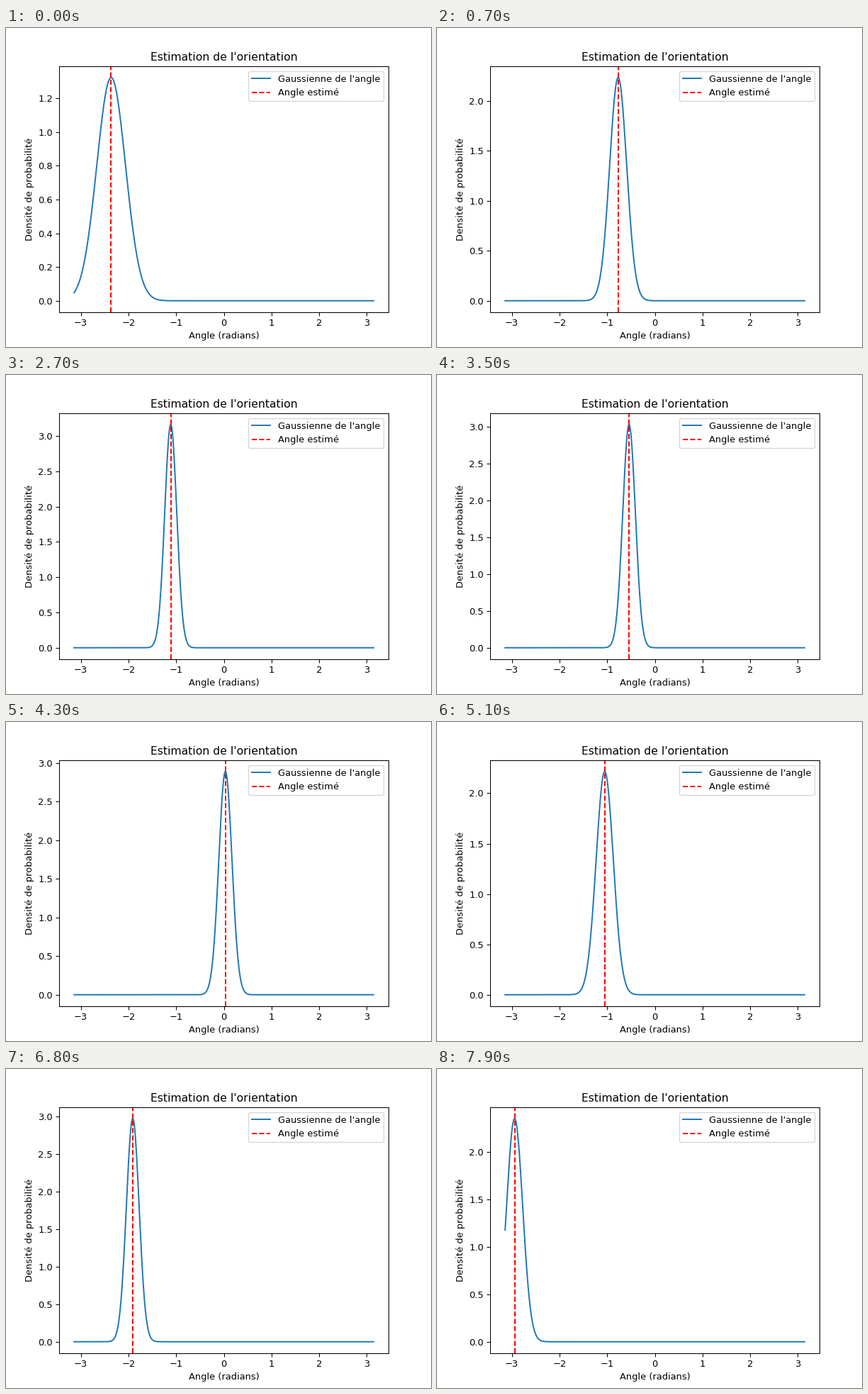
These frames come from a looping animation (600x450 px, 8000 ms). A matplotlib script:

```python
import matplotlib.pyplot as plt
import numpy as np
from matplotlib.animation import FuncAnimation

FRAMES, INTERVAL = 80, 100

# Poses: time in s, mean angle, peak density
POSES = [
    (0.0, -2.364, 1.323),
    (1.4, 0.826, 3.142),
    (2.7, -1.114, 3.163),
    (4.3, 0.033, 2.892),
    (5.9, -2.135, 1.541),
    (6.8, -1.911, 2.979),
    (7.9, -2.942, 2.353),
]

angles = np.linspace(-np.pi, np.pi, 1000)
fig, ax = plt.subplots(figsize=(6.4, 4.8), dpi=93.75)


def pose(t):
    """Ease from one pose to the next along a half cosine."""
    for (t0, *start), (t1, *end) in zip(POSES, POSES[1:]):
        if t <= t1:
            break
    k = (1 - np.cos(np.pi * (t - t0) / (t1 - t0))) / 2
    return [a + (b - a) * k for a, b in zip(start, end)]


def gaussian(x, mean, peak):
    return peak * np.exp(-np.pi * (peak * (x - mean)) ** 2)


def draw(i):
    mean, peak = pose(i * INTERVAL / 1000)
    ax.clear()
    ax.plot(angles, gaussian(angles, mean, peak), label="Gaussienne de l'angle")
    ax.axvline(mean, color="r", linestyle="--", label="Angle estimé")
    ax.set_title("Estimation de l'orientation")
    ax.set_xlabel("Angle (radians)")
    ax.set_ylabel("Densité de probabilité")
    # The legend jumps to the left corner when the peak reaches the right one
    ax.legend(loc="best")


anim = FuncAnimation(fig, draw, frames=FRAMES, interval=INTERVAL,
                     repeat=True, repeat_delay=0)
plt.show()
```
